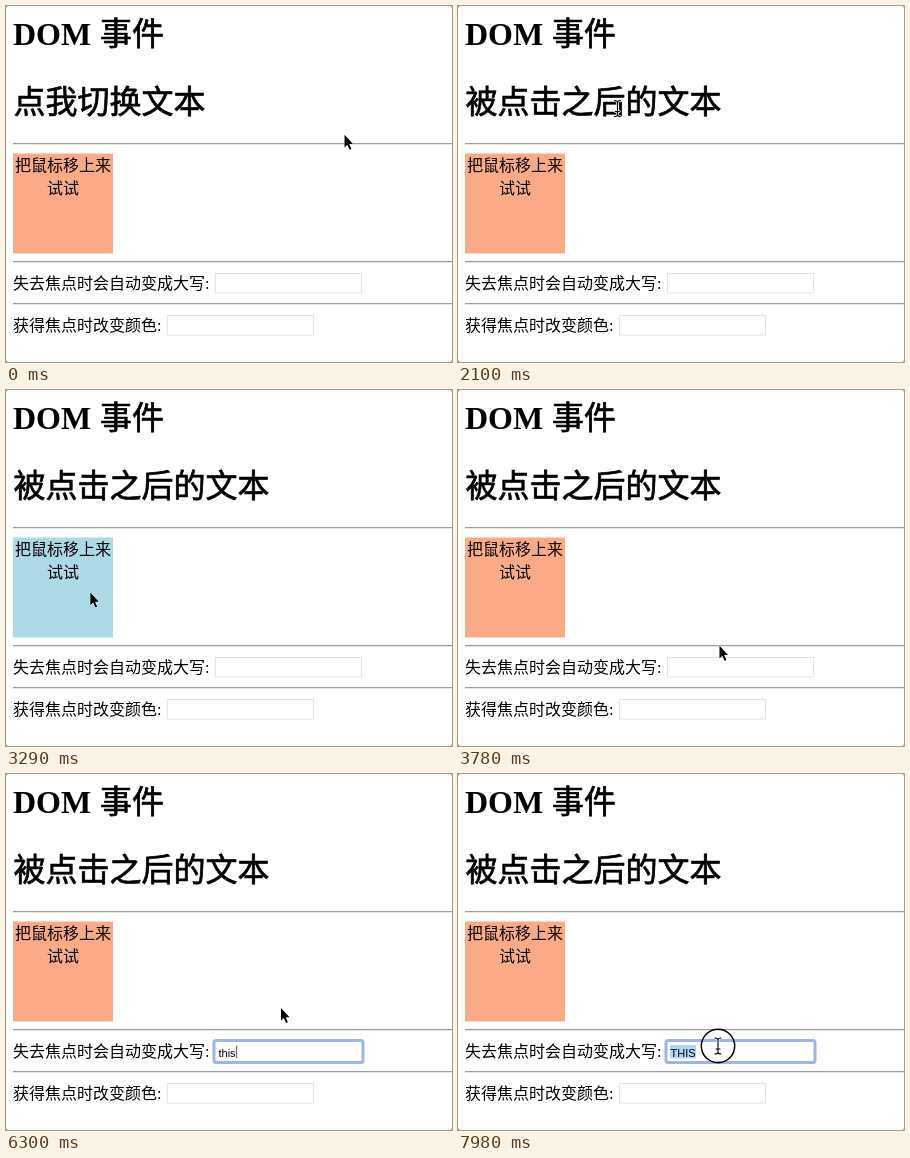
An HTML page that plays this animation: 446 px wide and 356 px high, repeating every 8 s.

```html
<!DOCTYPE html>
<html lang="zh-CN">
<head>
<meta charset="utf-8">
<title>DOM 事件</title>
<style>
  html, body { margin: 0; width: 100%; height: 100%; overflow: hidden; background: #777; }
  svg { display: block; width: 446px; height: 356px; }
  text { font: 16px "Liberation Serif", "Noto Sans CJK SC", "Noto Sans CJK", serif; fill: #000; white-space: pre; }
  .h1 { font-size: 32px; stroke: #000; stroke-width: .7; }
  .bold { font-weight: 700; stroke: none; }
  .mid { text-anchor: middle; }
  .field { font: 11px "Liberation Sans", Arial, sans-serif; }
  .input { fill: #fff; stroke: #e4e4e4; }
</style>
</head>
<body>
<svg viewBox="0 0 446 356">
  <rect width="446" height="356" rx="2" fill="#fff"/>

  <text class="h1 bold" x="7" y="39">DOM</text>
  <text class="h1" x="94" y="39">事件</text>
  <text class="h1" id="title" x="7.5" y="106.5"></text>

  <g id="rules"></g>

  <rect id="box" x="7" y="147.5" width="100" height="100"/>
  <text class="mid" x="57" y="165">把鼠标移上来</text>
  <text class="mid" x="57" y="187.5">试试</text>

  <text x="7" y="283">失去焦点时会自动变成大写:</text>
  <rect class="input" x="209.5" y="267.5" width="146" height="19.5"/>
  <rect id="ring" x="208" y="266.5" width="149" height="22" rx="2" fill="#fff" stroke="#9bb5e6" stroke-width="3"/>
  <rect id="selection" x="212" y="271" height="13.5" fill="#b4d5fb"/>
  <text class="field" id="value" x="212.5" y="282.5"></text>
  <path id="caret" d="M212.5 271.5V284" stroke="#555"/>

  <text x="7" y="325">获得焦点时改变颜色:</text>
  <rect class="input" x="161.5" y="309.5" width="146" height="19.5"/>

  <g id="pointer">
    <circle id="press" r="16.7" fill="none" stroke="#000" stroke-width="1.5"/>
    <path id="arrow" d="M.5 .8V13.4L3.3 10.7L5.6 15.8L7.4 15L5.2 10H9Z" stroke="#fff" paint-order="stroke"/>
    <g id="beam" fill="none" stroke-linecap="round">
      <path id="beamShape" d="M-3-8Q0-8 0-6Q0-8 3-8M0-6V6M-3 8Q0 8 0 6Q0 8 3 8M-2 3H2" stroke="#fff" stroke-width="2.6"/>
      <use href="#beamShape"/>
    </g>
  </g>
</svg>
<script>
const LOOP = 8000, STEP = 70;
const FOCUS = 4200, TYPE = 5600, BLUR = 6580, REFOCUS = 7350, SELECT = 7910;
const $ = id => document.getElementById(id);
const set = (id, name, value) => $(id).setAttribute(name, value);
const show = (id, on) => set(id, 'visibility', on ? 'visible' : 'hidden');
const inRect = (x, y, l, t, r, b) => x >= l && x < r && y >= t && y < b;

// dark copy of the beam on top of its white halo
const dark = $('beamShape').cloneNode();
dark.removeAttribute('id');
dark.setAttribute('stroke', '#000');
dark.setAttribute('stroke-width', 1.1);
$('beam').replaceChild(dark, $('beam').lastElementChild);

$('rules').innerHTML = [137, 255, 297].map(y =>
  `<path d="M7 ${y + .5}H446" stroke="#9c9c9c"/><path d="M7 ${y + 1.5}H446" stroke="#e6e6e6"/>`).join('');

// pointer moves: start, end, x, y reached
const moves = [
  [0, 420, 160, 102],
  [2080, 2520, 62, 200],
  [2660, 2870, 183, 147],
  [2870, 3360, 78, 205],
  [3430, 3780, 261, 255],
  [3780, 4060, 260, 272],
  [4690, 4970, 259, 247],
  [6160, 6510, 303, 208],
  [6930, 7000, 303, 232],
  [7000, 7280, 260, 272]
];
const clicks = [630, 1540, FOCUS, BLUR, REFOCUS, 7770, SELECT];
// the gaps between keys grow evenly
const keys = [...'this'].map((_, i) => TYPE + STEP * i * (i + 1) / 2);
const caretEvents = [FOCUS, ...keys, REFOCUS];

function pointerAt(t) {
  let x = 338, y = 128;
  for (const [from, to, tx, ty] of moves) {
    const u = Math.min(1, Math.max(0, (t - from) / (to - from)));
    const p = u * u * (3 - 2 * u);
    x += (tx - x) * p;
    y += (ty - y) * p;
  }
  return [x, y];
}

function render(time) {
  const t = Math.floor(time / STEP) * STEP;
  const [x, y] = pointerAt(t);
  const clicked = t >= 770, selected = t >= SELECT;
  const focused = t >= FOCUS && t < BLUR || t >= REFOCUS;
  const typed = keys.filter(k => t >= k).length;

  $('title').textContent = clicked ? '被点击之后的文本' : '点我切换文本';
  set('box', 'fill', inRect(x, y, 7, 148, 107, 248) ? '#add8e6' : '#fbaa88');

  $('value').textContent = t >= BLUR ? 'THIS' : 'this'.slice(0, typed);
  const width = typed ? $('value').getComputedTextLength() + 1 : 0;
  const lastEvent = Math.max(0, ...caretEvents.filter(e => e <= t));
  show('ring', focused);
  show('selection', selected);
  set('selection', 'width', width);
  show('caret', focused && !selected && Math.floor((t - lastEvent) / 500) % 2 === 0);
  set('caret', 'transform', `translate(${width})`);

  const overField = inRect(x, y, 209, 267, 356, 288);
  const overTitle = inRect(x, y, 7, 78, clicked ? 263 : 199, 116);
  const overText = overField || overTitle;
  const visible = t < TYPE || t >= 6230;
  const hold = overField ? 70 : 140;
  set('pointer', 'transform', `translate(${x} ${y})`);
  show('arrow', visible && !overText);
  show('beam', visible && overText);
  show('press', clicks.some(c => t >= c && t < c + hold) || selected);
}

function tick() {
  render(performance.now() % LOOP);
  requestAnimationFrame(tick);
}
tick();
</script>
</body>
</html>
```
